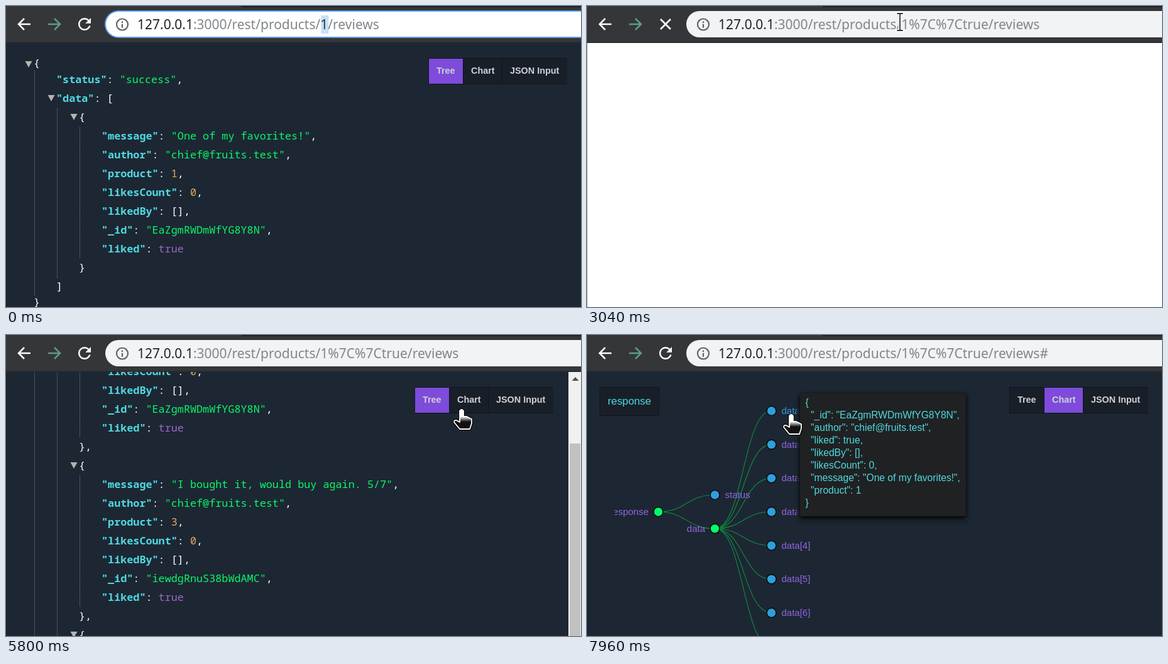
Animation, 915 px wide and 480 px high, one loop 8000 ms. Source, as an HTML page with a canvas:

```html
<!DOCTYPE html>
<html lang="en">
<head>
<meta charset="utf-8">
<title>Review API walkthrough</title>
<style>
html, body { margin: 0; width: 100%; height: 100%; overflow: hidden; background: #1d2733; }
canvas { display: block; }
</style>
</head>
<body>
<canvas id="stage" width="915" height="480"></canvas>
<script>
const W = 915, H = 480, LOOP = 8000;
const ctx = document.getElementById('stage').getContext('2d');

const URL_FONT = '21px "Noto Sans", sans-serif';
const MONO = '16.8px "Noto Sans Mono", monospace';
const SANS = '"Liberation Sans", Arial, sans-serif';
const PAGE = '#1d2733', CYAN = '#4fd9e2', GREEN = '#00ff6a', BLUE = '#2f9fdb', PURPLE = '#9165e0';
const VALUE_COLORS = { string: '#08f76b', number: '#e0aa5c', boolean: '#9a68c8', object: '#fff' };

const HOST = '127.0.0.1', PATH = ':3000/rest/products/';
const TYPED = PATH + '1||true/reviews', ENCODED = PATH + '1%7C%7Ctrue/reviews';
const URL_X = 209, SUGGESTION_X = 226;

const review = (message, product, _id) => ({
  message, author: 'chief@fruits.test', product, likesCount: 0, likedBy: [], _id, liked: true
});
const reviews = [
  review('One of my favorites!', 1, 'EaZgmRWDmWfYG8Y8N'),
  review('I bought it, would buy again. 5/7', 3, 'iewdgRnuS38bWdAMC')
];

const clamp = v => Math.max(0, Math.min(1, v));
const lerp = (a, b, k) => a + (b - a) * k;
const cubic = v => { v = clamp(v); return v < .5 ? 4 * v ** 3 : 1 - (2 - 2 * v) ** 3 / 2; };

function text(str, x, y, color, font, align = 'left') {
  ctx.font = font;
  ctx.fillStyle = color;
  ctx.textAlign = align;
  ctx.fillText(str, x, y);
  return x + ctx.measureText(str).width;
}
function measure(str, font) {
  ctx.font = font;
  return ctx.measureText(str).width;
}
function rect(x, y, w, h, color) {
  ctx.fillStyle = color;
  ctx.fillRect(x, y, w, h);
}
function round(x, y, w, h, r, color) {
  ctx.beginPath();
  ctx.roundRect(x, y, w, h, r);
  ctx.fillStyle = color;
  ctx.fill();
}
function circle(x, y, r, color) {
  ctx.beginPath();
  ctx.arc(x, y, r, 0, 7);
  ctx.fillStyle = color;
  ctx.fill();
}
function stroke(d, color, width, x = 0, y = 0) {
  ctx.save();
  ctx.translate(x, y);
  ctx.strokeStyle = color;
  ctx.lineWidth = width;
  ctx.stroke(new Path2D(d));
  ctx.restore();
}
function fillIcon(d, x, y, scale, color) {
  ctx.save();
  ctx.translate(x, y);
  ctx.scale(scale, scale);
  ctx.translate(-12, -12);
  ctx.fillStyle = color;
  ctx.fill(new Path2D(d));
  ctx.restore();
}

const RELOAD = 'M17.65 6.35C16.2 4.9 14.21 4 12 4c-4.42 0-7.99 3.58-7.99 8s3.57 8 7.99 8c3.73 0 6.84-2.55 7.73-6h-2.08c-.82 2.33-3.04 4-5.65 4-3.31 0-6-2.69-6-6s2.69-6 6-6c1.66 0 3.14.69 4.22 1.78L13 11h7V4z';
const GLOBE = 'M12 2a10 10 0 1 0 0 20a10 10 0 1 0 0-20zm-1 17.93c-3.95-.49-7-3.85-7-7.93 0-.62.08-1.21.21-1.79L9 15v1c0 1.1.9 2 2 2zm6.9-2.54c-.26-.81-1-1.39-1.9-1.39h-1v-3c0-.55-.45-1-1-1H8v-2h2c.55 0 1-.45 1-1V7h2c1.1 0 2-.9 2-2v-.41c2.93 1.19 5 4.06 5 7.41 0 2.08-.8 3.97-2.1 5.39z';
const ARROW = 'M10 0H-8M0-9L-9 0L0 9';

function address(x, rest) {
  const end = text(HOST, x, 37, '#202124', URL_FONT);
  return text(rest, end, 37, '#80868b', URL_FONT);
}

function toolbar(t) {
  rect(0, 0, W, 59, '#35363a');
  rect(375, 0, W, 2, '#1f2023');
  rect(0, 57.5, W, 1.5, '#25282c');
  stroke(ARROW, '#fff', 2.5, 29, 29);
  ctx.save();
  ctx.translate(77, 29);
  ctx.scale(-1, 1);
  stroke(ARROW, '#5f9a8a', 2.5);
  ctx.restore();
  if (t >= 2800 && t < 3480) stroke('M-8-8L8 8M8-8L-8 8', '#fff', 2.6, 125, 29);
  else fillIcon(RELOAD, 125, 29, 1.25, '#fff');

  if (t >= 850 && t < 2720) return;
  const focused = t < 850;
  if (focused) {
    round(157, 7, W, 44, 22, '#5f9de8');
    round(159, 9, W, 40, 20, '#fff');
  } else round(158, 8, W, 42, 21, '#f1f3f4');
  stroke('M9 0A9 9 0 1 1-9 0A9 9 0 1 1 9 0M0-5V-2.6M0-.8V5.2', '#5f6368', 2.2, 185, 29.5);
  if (focused) {
    const x = URL_X + measure(HOST + PATH, URL_FONT);
    rect(x + 1, 15, 12, 29, '#c8e0f8');
    address(URL_X, PATH + '1/reviews');
    text('1', x, 37, '#3c4043', URL_FONT);
  } else address(URL_X, ENCODED + (t >= 5960 ? '#' : ''));
}

function dropdown(t) {
  ctx.save();
  ctx.shadowColor = 'rgba(40,38,48,.65)';
  ctx.shadowBlur = 26;
  ctx.shadowOffsetY = 8;
  round(149, 2, W, 171, 13, '#fff');
  ctx.restore();
  rect(149, 56, W, 59, '#f1f3f4');
  fillIcon(GLOBE, 185, 29.5, 1, '#5f6368');
  fillIcon(GLOBE, 185, 85, 1, '#5f6368');
  stroke('M4 -2.5A5.5 5.5 0 1 1-7-2.5A5.5 5.5 0 1 1 4-2.5M2.4 1.6L8.5 7.7', '#5f6368', 2.1, 185, 143);
  address(SUGGESTION_X, TYPED);
  text(HOST + ENCODED, SUGGESTION_X, 92, '#1f78c8', 'bold ' + URL_FONT);
  const end = text(HOST + TYPED, SUGGESTION_X, 151, '#202124', URL_FONT);
  text(' - Quarvo Search', end, 151, '#70757a', URL_FONT);

  // The caret walks from "true" over "/reviews" to the end of the address.
  const steps = t < 1880 ? 0 : t < 2130 ? 1 : Math.min(8, 2 + Math.floor((t - 2130) / 55));
  if (t < 1300 || t >= 1800)
    rect(Math.floor(595 + measure('/reviews'.slice(0, steps), URL_FONT)), 14, 1, 30, '#202124');
}

function tabs(active, right) {
  let x = right - 221;
  rect(x, 83, 221, 42, '#0f141b');
  [['Tree', 54], ['Chart', 61], ['JSON Input', 103]].forEach(([label, w]) => {
    rect(x + 1, 84, w, 40, label === active ? '#7e4bdb' : '#191f29');
    text(label, x + 13, 108, '#cfd1d3', 'bold 14.4px ' + SANS);
    x += w + 1;
  });
}

function foldMark(x, y) {
  ctx.beginPath();
  ctx.moveTo(x - 14.5, y - 10);
  ctx.lineTo(x - 3.5, y - 10);
  ctx.lineTo(x - 9, y);
  ctx.fillStyle = '#b4b4ae';
  ctx.fill();
}
function guide(x, top, bottom) {
  ctx.setLineDash([1, 1]);
  stroke(`M${x + .5} ${top}V${bottom}`, '#74808b', 1);
  ctx.setLineDash([]);
}
function pair(x, y, key, value, color, tail) {
  const end = text(`"${key}"`, x, y, CYAN, 'bold ' + MONO);
  const afterColon = text(': ', end, y, '#fff', MONO);
  const afterValue = text(value, afterColon, y, color, MONO);
  text(tail, afterValue, y, '#fff', MONO);
}

function jsonTree(list, more, scroll) {
  const white = (s, x, y) => text(s, x, y, '#fff', MONO);
  ctx.save();
  ctx.translate(0, -scroll);
  white('{', 44, 97);
  foldMark(45, 98);
  pair(80, 123, 'status', '"success"', VALUE_COLORS.string, ',');
  pair(80, 153, 'data', '[', '#fff', '');
  foldMark(81, 152);
  let y = 183;
  for (const item of list) {
    white('{', 116, y);
    foldMark(117, y - 1);
    guide(117, y + 10, y + 220);
    const keys = Object.keys(item);
    keys.forEach((key, i) => pair(152, y + 30 * (i + 1), key, JSON.stringify(item[key]),
      VALUE_COLORS[typeof item[key]], i < keys.length - 1 ? ',' : ''));
    y += 240;
    white(more ? '},' : '}', 116, y);
    y += 30;
  }
  if (more) {
    white('{', 116, y);
    foldMark(117, y - 1);
  } else {
    white(']', 80, y);
    white('}', 44, y + 25);
  }
  guide(45, 103, more ? 900 : 463);
  guide(81, 163, more ? 900 : 434);
  ctx.restore();
}

function scrollbar(scroll) {
  rect(895, 59, 20, H, '#f1f1f1');
  rect(897, 82 + Math.round(scroll * .381), 17, 367, '#c1c1c1');
  ctx.beginPath();
  ctx.moveTo(900.5, 73);
  ctx.lineTo(906, 67);
  ctx.lineTo(911.5, 73);
  ctx.fillStyle = '#505050';
  ctx.fill();
}

const ROOT = { label: 'response', x: 113.5, y: 282, parent: true };
const DATA = { label: 'data', x: 203.5, y: 308.8, parent: true, from: ROOT };
const nodes = [ROOT, { label: 'status', x: 203.5, y: 255, from: ROOT }, DATA];
for (let i = 0; i < 8; i++) nodes.push({ label: `data[${i}]`, x: 293.5, y: 121 + 53.67 * i, from: DATA });

function chart(t) {
  if (t >= 6050) {
    const k = cubic((t - 6090) / 750);
    const place = n => [lerp(ROOT.x, n.x, k), lerp(ROOT.y, n.y, k)];
    ctx.save();
    ctx.beginPath();
    ctx.rect(44, 59, W, H);
    ctx.clip();
    for (const n of nodes) {
      if (!n.from) continue;
      const [x1, y1] = place(n.from), [x2, y2] = place(n), mid = (x1 + x2) / 2;
      stroke(`M${x1} ${y1}C${mid} ${y1} ${mid} ${y2} ${x2} ${y2}`, '#0d8f40', 1.1);
    }
    for (const n of nodes) {
      const [x, y] = place(n), hovered = n.label === 'data[0]' && t >= 7830;
      circle(x, y, 8.3 * k, '#080c10');
      circle(x, y, 6.7 * k, n.parent ? GREEN : BLUE);
      ctx.globalAlpha = k;
      text(n.label, x + (n.parent ? -15.5 : 16), y + 5, hovered ? BLUE : PURPLE,
        '15px ' + SANS, n.parent ? 'right' : 'left');
      ctx.globalAlpha = 1;
    }
    ctx.restore();
  }
  rect(20, 83, 95, 46, '#0f141b');
  rect(21, 84, 93, 44, '#191f29');
  text('response', 33, 111, CYAN, '16.8px ' + SANS);
  tabs('Chart', 893);
  if (t >= 7870) tooltip(clamp((t - 7820) / 120));
}

function tooltip(alpha) {
  ctx.save();
  ctx.globalAlpha = alpha;
  round(334, 90, 274, 212, 9, 'rgba(27,36,46,.8)');
  ctx.shadowColor = '#000';
  ctx.shadowBlur = 7;
  ctx.shadowOffsetY = 3;
  round(339, 93, 264, 196, 3, '#202122');
  ctx.shadowColor = 'transparent';
  const item = reviews[0], keys = Object.keys(item).sort();
  const rows = keys.map((key, i) =>
    `"${key}": ${JSON.stringify(item[key])}${i < keys.length - 1 ? ',' : ''}`);
  ['{', ...rows, '}'].forEach((row, i) =>
    text(row, i && i <= rows.length ? 356 : 347.5, 113 + 20 * i, CYAN, '15.6px ' + SANS));
  ctx.restore();
}

// time, x, y
const cursorPath = [
  [310, 499, 20], [390, 498, 25], [3700, 498, 25], [3900, 552, 437], [4070, 547, 357],
  [5320, 547, 357], [5800, 725, 119], [5880, 727, 113], [6000, 727, 113], [6690, 785, 442],
  [7000, 785, 442], [7220, 459, 242], [7790, 324, 154], [7830, 325, 127], [LOOP, 325, 127]
];

function cursor(t) {
  if (t < 310) return;
  const i = cursorPath.findIndex(p => p[0] > t);
  const [t0, x0, y0] = cursorPath[i - 1], [t1, x1, y1] = cursorPath[i];
  let k = (t - t0) / (t1 - t0);
  if (t0 === 7220) k = 1 - (1 - k) ** 2;
  const x = lerp(x0, x1, k), y = lerp(y0, y1, k);
  ctx.save();
  ctx.translate(Math.round(x), Math.round(y));
  ctx.lineJoin = ctx.lineCap = 'round';
  if (y < 58) iBeam();
  else if (t >= 7830 || (t > 5500 && t < 6300 && y < 126)) pointingHand();
  else if (t >= 6000) openHand();
  else arrow();
  ctx.restore();
}
function iBeam() {
  const d = 'M-4-13H-1L0-12L1-13H4M0-12V13M-4 14H-1L0 13L1 14H4';
  stroke(d, '#fff', 5);
  stroke(d, '#303030', 1.8);
}
function outlined(d, fill, line, width) {
  ctx.fillStyle = fill;
  ctx.fill(new Path2D(d));
  stroke(d, line, width);
}
function arrow() {
  outlined('M0 1V28L6 25L9 30H14L13 23L18 18Z', '#484848', '#fff', 1.8);
}
function pointingHand() {
  const d = 'M-3 2Q0-2 3 2V11L8 11L12 13L16 15V22L13 31H-3L-12 20Q-12 16-8 17L-3 20Z';
  const shade = ctx.createLinearGradient(0, 0, 0, 31);
  shade.addColorStop(.35, '#fff');
  shade.addColorStop(.62, '#111');
  stroke(d, '#000', 4);
  outlined(d, shade, '#fff', 1.8);
}
function openHand() {
  const d = 'M-4-5L-2 2M0-7V2M4-6L3 2M7-3L5 3M-7 2L-3 6M-3 3H4L3 7H-2Z';
  stroke(d, '#10151b', 5.5);
  stroke(d, '#fff', 3.2);
  stroke('M-2-3V1M2-4V1M5-2V1', '#30363d', .8);
}

function page(t) {
  const loading = t >= 3040 && t < 3330;
  rect(0, 59, W, H, loading ? '#fff' : PAGE);
  if (!loading) {
    if (t >= 5960) chart(t);
    else if (t < 3040) {
      jsonTree(reviews.slice(0, 1), false, 0);
      tabs('Tree', 893);
    } else {
      const scroll = Math.round(120 * cubic((t - 4690) / 250) + 119 * cubic((t - 5080) / 240));
      jsonTree(reviews, true, scroll);
      tabs('Tree', 871);
      scrollbar(scroll);
    }
  }
  rect(0, 59, 1, H, loading ? '#b8b8b8' : '#151d26');
}

function frame(now) {
  const t = now % LOOP;
  page(t);
  toolbar(t);
  if (t >= 850 && t < 2720) dropdown(t);
  cursor(t);
  requestAnimationFrame(frame);
}
requestAnimationFrame(frame);
</script>
</body>
</html>
```
